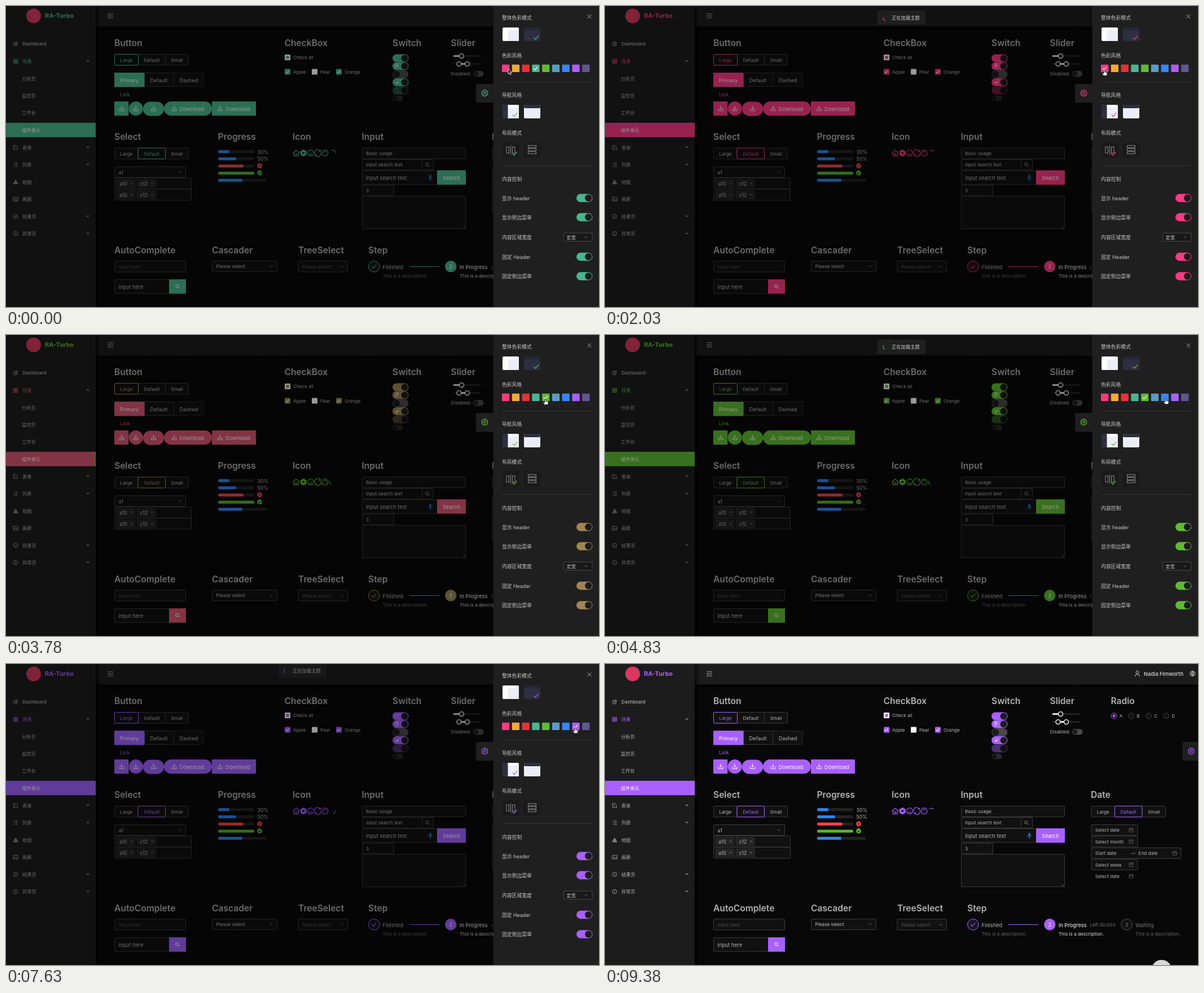
Recreate the animation shown at these times as an HTML page. Size 1051x533 px, loop 9450 ms.

```html
<!DOCTYPE html>
<html lang="zh">
<head>
<meta charset="utf-8">
<title>RA-Turbo</title>
<style>
html, body { margin: 0; width: 100%; height: 100%; overflow: hidden; background: #080808; }
svg { display: block; width: 1051px; height: 533px; }
text { font-family: Inter, "Noto Sans CJK SC", "Noto Sans CJK", sans-serif; dominant-baseline: central; white-space: pre; }
.f-now { fill: var(--now); }
.f-btn { fill: var(--btn); }
.f-sw { fill: var(--sw); }
.f-line { fill: var(--line); }
.s-now { stroke: var(--now); fill: none; }
.s-btn { stroke: var(--btn); fill: none; }
.s-line { stroke: var(--line); fill: none; }
</style>
</head>
<body>
<svg id="stage" viewBox="0 0 1051 533"></svg>
<script>
const LOOP = 9450;
const SWATCHES = ['#fb3983', '#f4a936', '#e33333', '#49b58e', '#5fba33', '#5a9bc5', '#3586fa', '#a960ff', '#605791'];
// [time, swatch index, spinner phase of the notice]
const THEMES = [[-2000, 3, 0], [1550, 0, 226], [3670, 4, 8], [5500, 6, 57], [7400, 7, 146]];
const POINTER = [[0, 890, 111], [500, 885, 112], [2500, 885, 113], [3300, 956, 113], [4200, 956, 113],
  [4830, 994, 112], [5900, 992, 112], [6440, 1012, 119], [6900, 1010, 112], [7600, 1010, 112],
  [8500, 636, 160], [9450, 636, 160]];
const CLOSE_AT = 8598;

// ---- drawing helpers ----
const attrs = o => Object.entries(o).map(([k, v]) => ` ${k}="${v}"`).join('');
const rect = (x, y, w, h, o) => `<rect x="${x}" y="${y}" width="${w}" height="${h}"${attrs(o)}/>`;
const circle = (x, y, r, o) => `<circle cx="${x}" cy="${y}" r="${r}"${attrs(o)}/>`;
const path = (d, o = {}) => `<path d="${d}"${attrs({ fill: 'none', stroke: '#aaa', 'stroke-width': 1, ...o })}/>`;
const text = (x, y, s, size = 8.2, fill = '#b4b4b4', o = {}) =>
  `<text x="${x}" y="${y}" font-size="${size}" ${fill.startsWith('f-') ? `class="${fill}"` : `fill="${fill}"`}${attrs(o)}>${s}</text>`;
const mid = { 'text-anchor': 'middle' };
const at = (x, y, body) => `<g transform="translate(${x} ${y})">${body}</g>`;
const box = (x, y, w, h, o = {}) => rect(x + .5, y + .5, w - 1, h - 1, { fill: '#111', stroke: '#3a3a3a', rx: 1, ...o });
const chevron = (x, y, s = 1, c = '#bbb') => path(`M${x - 2.3} ${y - s}l2.3 ${2 * s}l2.3 ${-2 * s}`, { stroke: c });
const down = (x, y) => chevron(x, y, 1.4, '#666');
const tick = (x, y, k = 1, o = {}) => path(`M${x - 3 * k} ${y}l${2.2 * k} ${2.3 * k}l${4 * k} ${-4.8 * k}`, { stroke: '#fff', 'stroke-width': 1.1, ...o });
const heading = (x, y, s) => text(x, y, s, 15.6, '#b2b2b2', { 'font-weight': 600 });
const accentTick = (x, y) => tick(x, y, 1.35, { stroke: 'var(--now)', 'stroke-width': 1.2 });
const download = (x, y) => path(`M${x - 4} ${y + 1}v3h8v-3M${x} ${y - 4.5}v6M${x - 2.2} ${y - .7}l2.2 2.2l2.2 -2.2`, { stroke: '#fff' });
const lens = (x, y, c) => path(`M${x + 1.5} ${y + 1.5}l2.3 2.3M${x + 2} ${y - .5}a2.7 2.7 0 1 1 -5.4 0a2.7 2.7 0 1 1 5.4 0`, { stroke: c });
const arc = o => path('M0 -5A5 5 0 0 1 5 0', { 'stroke-linecap': 'round', transform: 'rotate(-45)', ...o });

// six-toothed outline
function gear(r, o) {
  const points = [];
  for (let a = 0; a < 360; a += 60)
    for (const [turn, k] of [[-16, 1], [16, 1], [22, .8], [38, .8]]) {
      const rad = (a + turn) * Math.PI / 180;
      points.push(`${(Math.sin(rad) * r * k).toFixed(2)} ${(-Math.cos(rad) * r * k).toFixed(2)}`);
    }
  return `<path d="M${points.join('L')}Z" stroke-linejoin="round"${attrs(o)}/>`;
}

function toggle(x, y, w, h, on = true, mark = '', opacity = 1) {
  const bg = rect(x, y, w, h, { rx: h / 2, ...(on ? { class: 'f-sw' } : { fill: '#494949' }) });
  const knob = circle(on ? x + w - h / 2 : x + h / 2, y + h / 2, h / 2 - 1, { fill: '#1c1c1c' });
  return `<g opacity="${opacity}">${bg}${knob}${mark}</g>`;
}

function segments(xs, y, active) {
  const names = ['Large', 'Default', 'Small'];
  const cell = i => [xs[i], y, xs[i + 1] - xs[i] + 1, 20.4];
  return names.map((_, i) => box(...cell(i))).join('') +
    box(...cell(active), { stroke: 'var(--line)' }) +
    names.map((s, i) => text((xs[i] + xs[i + 1]) / 2 + .5, y + 10.5, s, 8.2, i === active ? 'f-line' : '#b4b4b4', mid)).join('');
}

function check(x, y, label, on, partial) {
  const fill = on ? { class: 'f-line' } : { fill: '#fff' };
  return rect(x, y, 10, 10, { rx: 1, ...fill }) + (on ? tick(x + 4.6, y + 5.2, .9) : '') +
    (partial ? rect(x + 2.3, y + 2.3, 5.4, 5.4, { class: 'f-line' }) : '') + text(x + 15, y + 5.3, label);
}

// ---- side menu ----
function sideMenu() {
  const g = { stroke: '#a2a2a2', 'stroke-width': .9 };
  const icons = {
    pie: path('M-1 -3A3.5 3.5 0 1 0 3 1H-1ZM1 -3.8A3.5 3.5 0 0 1 3.8 -1H1Z', g),
    form: path('M1 -3.5H-3.5V3.5H3.5V0M-1 1L3.5 -3.5', g),
    list: path('M-1.5 -3H4M-1.5 0H4M-1.5 3H4M-4 -3h1M-4 0h1M-4 3h1', g),
    warn: path('M0 -3.5L4 3.5H-4Z', { ...g, fill: '#777' }),
    image: path('M-4 -3.2H4V3.2H-4ZM-3 2L-1 -.5L1 1.5L2 .5L3.5 2', g),
    ok: circle(0, 0, 3.8, { fill: 'none', ...g }) + tick(-.2, .3, .55, g),
    info: circle(0, 0, 3.8, { fill: 'none', ...g }) + path('M0 -2v1M0 -.3V2.2', g)
  };
  const top = [['pie', 67, 'Dashboard'], ['form', 250.5, '表单', 1], ['list', 281, '列表', 1], ['warn', 311.5, '地图'],
    ['image', 342, '画廊'], ['ok', 372.5, '结果页', 1], ['info', 403, '异常页', 1]];
  let s = rect(0, 0, 159, 533, { fill: '#1c1c1c' }) + circle(49, 17.5, 13, { fill: '#d9375f' }) +
    text(69, 17, 'RA-Turbo', 11, 'f-now', { 'font-weight': 700 });
  for (const [icon, y, label, more] of top)
    s += at(17, y, icons[icon]) + text(29, y + .3, label, 8.2, '#b0b0b0', { 'font-weight': 500 }) + (more ? chevron(145, y - .5, 1.1, '#ddd') : '');
  for (const [x, y] of [[13.5, 94.5], [17.8, 94.5], [13.5, 98.8], [17.8, 98.8]])
    s += rect(x, y, 2.8, 2.8, { class: 's-btn', 'stroke-width': .9 });
  s += text(29, 98, '场景', 8.2, 'f-btn') + chevron(145, 97.5, -1.1, '#ddd');
  s += rect(0, 206.8, 159, 25.5, { class: 'f-btn' }) + rect(157, 206.8, 2, 25.5, { class: 'f-now' });
  ['分析页', '监控页', '工作台', '组件单元'].forEach((n, i) => s += text(28, 128.5 + 30.4 * i, n, 8.2, i === 3 ? '#fff' : '#b0b0b0'));
  return s;
}

// ---- header and page ----
function header() {
  const g = { stroke: '#999' };
  return rect(159, 0, 892, 36.5, { fill: '#1c1c1c' }) +
    rect(159, 36.5, 892, 8, { fill: 'url(#shadeY)' }) + rect(159, 0, 8, 533, { fill: 'url(#shadeX)' }) +
    path('M180 13.5h10M184 16.2h6M184 18.8h6M180 21.5h10M182.5 15.8v3.6l-2.5 -1.8z', { ...g, 'stroke-width': .9 }) +
    circle(943.5, 14.5, 2.5, { fill: 'none', stroke: '#ccc' }) + path('M939.3 22A4.3 4.6 0 0 1 947.8 22', { stroke: '#ccc' }) +
    text(955, 17.3, 'Nadia Fenworth', 9.2, '#c4c4c4', { 'font-weight': 600 }) +
    circle(1041.5, 17, 4.6, { fill: 'none', stroke: '#ccc', 'stroke-width': .8 }) +
    path('M1037 17h9M1041.5 12.4v9.2M1041.5 12.4q-4 4.6 0 9.2q4 -4.6 0 -9.2M1038 14.5h7M1038 19.5h7', { stroke: '#ccc', 'stroke-width': .7 });
}

function controls() {
  const btn = (x, y, w, h, rx = 1) => rect(x, y, w, h, { rx, class: 'f-btn' });
  let s = heading(192, 65, 'Button') + segments([192, 234, 282, 323], 85, 0);
  s += box(245, 118, 53, 25) + box(297, 118, 54, 25, { 'stroke-dasharray': '2 1.5' }) + btn(192, 118, 53.5, 25.5) +
    text(218.5, 131, 'Primary', 9.1, '#fff', mid) + text(271, 131, 'Default', 9.1, '#b4b4b4', mid) + text(324, 131, 'Dashed', 9.1, '#b4b4b4', mid) +
    text(202, 156.5, 'Link', 9.1, 'f-btn');
  s += btn(192, 169, 25.3, 25.3) + btn(217.5, 169, 25.3, 25.3, 12.7) + btn(242.8, 169.5, 37.4, 25.3, 12.7) + btn(280, 169, 85, 25.3, 12.7) + btn(365, 169, 78, 25.3);
  s += [205, 230, 261.5, 298, 379.5].map(x => download(x, 181.3)).join('') + [307.5, 389].map(x => text(x, 182, 'Download', 9.2, '#fff')).join('');

  s += heading(493.5, 65, 'CheckBox') + check(494, 86, 'Check all', false, true) +
    check(494, 111.5, 'Apple', true) + check(542, 111.5, 'Pear', false) + check(585, 111.5, 'Orange', true);

  s += heading(685, 65, 'Switch') + toggle(685, 85.5, 28.5, 14) + toggle(685, 99.5, 28.5, 14, true, text(689, 106.5, '开', 7.5, '#fff')) +
    toggle(685, 114, 28.5, 14, false) + toggle(685, 128, 28.5, 14, true, tick(693.5, 135, .9)) +
    toggle(685, 142.5, 28.5, 14, true, '', .42) + toggle(685, 158.7, 18.5, 9.8, false, '', .5);

  const knob = (x, y) => circle(x, y, 4, { fill: '#111', stroke: '#fff', 'stroke-width': 1.4 });
  s += heading(788.5, 65, 'Slider') + rect(793, 87.3, 49, 2.6, { fill: '#252525' }) + rect(793, 87.3, 14, 2.6, { fill: '#fff' }) + knob(807.5, 88.6) +
    rect(793, 101.3, 49, 2.6, { fill: '#252525' }) + rect(803, 101.3, 14, 2.6, { fill: '#fff' }) + knob(803, 102.6) + knob(817.5, 102.6) +
    text(788.5, 119.8, 'Disabled:') + toggle(828, 115, 18.5, 10.2, false);

  s += heading(896.5, 65, 'Radio');
  [902, 932.5, 963.5, 994.5].forEach((x, i) => s += circle(x, 91.7, 4.9, i ? { fill: '#111', stroke: '#444' } : { class: 's-line' }) + text(x + 9.7, 91.7, 'ABCD'[i]));
  return s + circle(902, 91.7, 2.5, { class: 'f-line' });
}

function inputs() {
  let s = heading(192, 231, 'Select') + segments([192, 233.5, 282, 323], 251, 1) + box(192, 284, 127, 20) + text(199.5, 294.5, 'a1', 8.8) + down(308, 294);
  for (const y of [304, 324]) {
    s += box(192, y, 137, 20.5);
    for (const [x, label] of [[195.5, 'a10'], [232, 'c12']])
      s += rect(x, y + 3, 33.5, 14.5, { fill: '#232323', stroke: '#303030', 'stroke-width': .7 }) + text(x + 5.5, y + 10.5, label, 8.8) +
        path(`M${x + 25} ${y + 8.2}l4 4m0 -4l-4 4`, { stroke: '#777', 'stroke-width': .8 });
  }

  s += heading(375.5, 231, 'Progress');
  [[64, 20, '#2d85ec'], [64, 32, '#2d85ec'], [64, 45, '#f0444a'], [64, 64, '#55b92c'], [86, 43, '#2d85ec']].forEach(([w, n, c], i) => {
    const y = 255.3 + i * 12.7;
    s += rect(376, y, w, 5.2, { rx: 2.6, fill: '#232323' }) + rect(376, y, n, 5.2, { rx: 2.6, fill: c });
  });
  s += text(445.5, 258.3, '30%', 8.8) + text(445.5, 270.8, '50%', 8.8) + circle(449.5, 283, 4.4, { fill: '#f0444a' }) +
    path('M448 281.5l3 3m0 -3l-3 3', { stroke: '#111' }) + circle(449.5, 295.7, 4.4, { fill: '#55b92c' }) + tick(449.3, 295.9, .65, { stroke: '#111' });

  const line = { class: 's-now', 'stroke-width': 1.1 };
  const face = circle(0, 0, 5.4, line) + path('M-2.4 1A2.5 2.5 0 0 0 2.4 1M-2.2 -1.5h.8M1.4 -1.5h.8', line);
  s += heading(508, 231, 'Icon') + at(514.3, 260.3, path('M-6 .5L0 -5.2L6 .5M-4.2 -1V5.2H4.2V-1M-1.3 5V1.5H1.3V5', line)) +
    at(527.2, 260.3, gear(5.6, { class: 'f-now', stroke: 'var(--now)' }) + circle(0, 0, 2, { fill: '#080808' })) +
    at(540, 260.3, face) + at(552.6, 260.3, path('M-5.2 1A5 5 0 0 1 4 -3.4M4.6 -5.5V-2.8H2M5.2 -1A5 5 0 0 1 -4 3.4M-4.6 5.5V2.8H-2', line)) +
    at(565.5, 260.3, `<g transform="rotate(180)">${face}</g>`) + at(578.5, 260.3, `<g id="spin">${arc(line)}</g>`);

  s += heading(630.5, 231, 'Input') + box(631, 251, 184, 20) + text(638, 261, 'Basic usage') +
    box(631, 271, 107, 20) + box(737, 271, 21, 20) + text(638, 281, 'input search text') + lens(747, 281, '#888') +
    box(631, 291, 134, 25.5) + text(638, 304.2, 'input search text', 9.2) +
    rect(750.6, 299, 3, 6, { rx: 1.5, fill: '#1d80dc' }) + path('M748.6 303A3.5 3.8 0 0 0 755.6 303M752.1 306.8V309.5', { stroke: '#1d80dc' }) +
    rect(764, 291, 51, 25.5, { class: 'f-btn' }) + text(789.5, 304.2, 'Search', 9.2, '#fff', mid) +
    box(631, 316.5, 57, 20) + text(638, 326.8, '3') + box(631, 336.5, 184, 58.5) + path('M810 393.5l3.5 -3.5M812 393.5l1.5 -1.5', { stroke: '#777', 'stroke-width': .7 });

  const calendar = (x, y) => path(`M${x - 3.5} ${y - 2.5}h7v6h-7zM${x - 3.5} ${y - .3}h7M${x - 1.6} ${y - 3.7}v2M${x + 1.6} ${y - 3.7}v2`, { stroke: '#666', 'stroke-width': .8 });
  s += heading(861, 231, 'Date') + segments([861.5, 903, 951.5, 993], 251, 1);
  [['Select date', 284], ['Select month', 304.3], ['Start date', 325, 160], ['Select week', 345.3], ['Select date', 365.7, 0]].forEach(([label, y, w = 83]) =>
    s += (w ? box(861.5, y, w, 20) : '') + text(868.7, y + 10.3, label) + calendar(w === 160 ? 1009.5 : 932.5, y + 9.8));
  return s + path('M932 335.5h7.5l-2.2 -1.7', { stroke: '#777', 'stroke-width': .8 }) + text(945.5, 335.3, 'End date');
}

function lastRow() {
  let s = heading(192, 432, 'AutoComplete') + box(192, 451, 127, 20.5) + text(199.5, 461.5, 'input here', 8.2, '#4c4c4c') +
    box(192, 484, 98, 25.5) + text(199.5, 497, 'input here', 9.2) + rect(289, 484, 30, 25.5, { class: 'f-btn' }) + lens(304, 496.5, '#fff') +
    heading(365, 432, 'Cascader') + box(365, 451, 116, 20) + text(372.5, 461, 'Please select', 8.2, '#c2c2c2') + down(470, 461) +
    heading(518, 432, 'TreeSelect') + box(517.5, 451, 88.5, 20.5) + text(525, 461.5, 'Please select', 8.2, '#555') + down(595, 461.5);
  s += heading(642, 432, 'Step') + circle(652.3, 461.3, 9.8, { fill: 'var(--line)', 'fill-opacity': .12, stroke: 'var(--line)' }) +
    tick(652, 461.5, 1.2, { stroke: 'var(--line)' }) + path('M715 461.5H768', { stroke: 'var(--now)', 'stroke-width': 1.2 }) +
    circle(788.3, 461.3, 10.2, { class: 'f-line' }) + text(788.3, 461.8, '2', 9.2, '#fff', mid) +
    circle(924.7, 461.3, 9.8, { fill: '#111', stroke: '#555' }) + text(924.7, 461.8, '3', 9.2, '#777', mid) +
    text(667.5, 462, 'Finished', 9.2) + text(803.8, 462, 'In Progress', 9.2, '#dcdcdc', { 'font-weight': 500 }) + text(940, 462, 'Waiting', 9.2, '#777') +
    `<g clip-path="url(#left)">${text(859, 462, 'Left 00:00:00', 8.2, '#777')}</g>`;
  [[667.5, '#666'], [803.8, '#ddd'], [940, '#666']].forEach(([x, c]) => s += text(x, 478.3, 'This is a description.', 8.2, c));
  return s + circle(986.5, 542, 18, { fill: '#d8d8d8' });
}

// ---- settings drawer ----
function drawer() {
  const label = (y, s) => text(879, y, s, 8.8, '#c6c6c6');
  const thumb = (x, y, fill) => rect(x, y, 29, 24, { rx: 2, fill });
  let s = rect(833, 138, 33, 33.3, { rx: 3, fill: '#1f1f1f' }) + rect(863.5, -5, 200, 545, { fill: '#1f1f1f' }) +
    at(848.5, 154.3, gear(5.6, { class: 's-now', 'stroke-width': 1.1 }) + circle(0, 0, 1.9, { class: 's-now', 'stroke-width': 1.1 })) +
    path('M1030.5 15l7 7m0 -7l-7 7', { stroke: '#aaa' });
  s += label(20.5, '整体色彩模式') + thumb(880, 38, '#fff') + rect(889.5, 43, 19.5, 19, { fill: '#ecedf6' }) +
    thumb(918, 38, '#2d2f40') + rect(918, 38, 29, 5, { fill: '#242636', rx: 2 }) + accentTick(939.5, 56) + label(87, '色彩风格');
  SWATCHES.forEach((c, i) => s += rect(879 + 17.77 * i, 103.7, 13.3, 13.3, { rx: 1, fill: c }));
  s += `<g id="pick">${tick(885.3, 110.5, 1.15)}</g>`;
  s += rect(879, 134, 160, 1, { fill: '#343434' }) + label(157.5, '导航风格') + thumb(880, 175, '#fff') + rect(889, 180, 20, 19, { fill: '#ecedf6' }) +
    rect(880, 175, 9.5, 24, { fill: '#2d2f40', rx: 1 }) + accentTick(902, 192.5) + thumb(918, 175, '#ecedf6') + rect(918, 175, 29, 6, { fill: '#2d2f40', rx: 2 });
  s += label(224, '布局模式') + [879.5, 917.5].map(x => rect(x, 241, 30, 28, { rx: 2, fill: '#1a1a1a' })).join('') +
    path('M887 249.5h4.5v11h-4.5zM897.5 249.5h4.5v11h-4.5zM894.5 246.5v17', { stroke: '#8c8c8c' }) + accentTick(901.5, 261.5) +
    [247, 252.5, 258].map(y => rect(925.5, y, 14, 3.8, { rx: .5, fill: 'none', stroke: '#8c8c8c', 'stroke-width': 1.1 })).join('');
  s += rect(879, 282, 160, 1, { fill: '#343434' }) + label(306, '内容控制');
  [[340, '显示 header'], [374, '显示侧边菜单'], [444, '固定 Header'], [478.5, '固定侧边菜单']].forEach(([y, n]) =>
    s += label(y, n) + toggle(1011, y - 7.2, 28.5, 14.4));
  return s + label(409.5, '内容区域宽度') + box(988, 401.5, 51.5, 15.5, { stroke: '#484848', fill: '#181818' }) + text(993.5, 409.5, '定宽', 8.2, '#ccc') + down(1028, 409.3);
}

const notice = `<g id="notice">${rect(483, 8, 85, 25.5, { rx: 1.5, fill: '#1f1f1f' })}${at(498, 21, `<g id="spin2">${arc({ class: 's-now', 'stroke-width': 1.1 })}</g>`)}${text(508, 21, '正在加载主题', 8.3, '#ccc')}</g>`;
const cursor = `<g id="cursor"><path id="arrow" d="M0 0V9.2L2.1 7.3L3.6 10.8L5.2 10.1L3.7 6.7H6.6Z" fill="#111" stroke="#fff" stroke-width=".9"/>
<path id="hand" d="M-1 .8Q0 -.5 1 .8V4.2Q5.2 4.2 5.2 6.2Q5.2 9 3.8 10.5H-1.4Q-2.8 8.5 -4 6.5Q-3.6 4.8 -1 7Z" fill="#fff" stroke="#111" stroke-width=".8"/></g>`;
const shade = (id, x, y) => `<linearGradient id="${id}" x2="${x}" y2="${y}"><stop stop-color="#000" stop-opacity=".7"/><stop offset="1" stop-opacity="0"/></linearGradient>`;

const stage = document.getElementById('stage');
stage.innerHTML = `<defs>${shade('shadeX', 1, 0)}${shade('shadeY', 0, 1)}<clipPath id="left"><rect x="855" y="450" width="50" height="24"/></clipPath></defs>` +
  rect(0, 0, 1051, 533, { fill: '#080808' }) + header() + sideMenu() + controls() + inputs() + lastRow() +
  rect(0, 0, 1051, 533, { id: 'mask', fill: '#000' }) + `<g id="drawer">${drawer()}</g>` + notice + cursor;

// ---- motion ----
const $ = id => document.getElementById(id);
const clamp = v => Math.max(0, Math.min(1, v));
const bezier = (x1, y1, x2, y2) => x => {
  const curve = (a, b, u) => 3 * a * u * (1 - u) ** 2 + 3 * b * u * u * (1 - u) + u ** 3;
  if (x <= 0 || x >= 1) return clamp(x);
  let lo = 0, hi = 1;
  for (let i = 0; i < 20; i++) {
    const m = (lo + hi) / 2;
    if (curve(x1, x2, m) < x) lo = m; else hi = m;
  }
  return curve(y1, y2, lo);
};
const ease = bezier(.25, .1, .25, 1), inOut = bezier(.645, .045, .355, 1), slide = bezier(.7, .3, .1, 1);
const glide = u => u * u * (3 - 2 * u);
const rgb = c => [1, 3, 5].map(i => parseInt(c.slice(i, i + 2), 16));
const mix = (a, b, u) => `rgb(${rgb(a).map((v, i) => Math.round(v + (rgb(b)[i] - v) * u))})`;

function render(t) {
  const n = THEMES.findLastIndex(k => k[0] <= t);
  const [start, index, phase] = THEMES[n];
  const age = t - start, to = SWATCHES[index], from = SWATCHES[THEMES[Math.max(0, n - 1)][1]];
  const set = (name, u) => stage.style.setProperty(name, mix(from, to, u));
  set('--now', 1);
  set('--btn', inOut(age / 300));
  set('--sw', glide(clamp(age / 200)));
  set('--line', ease(age / 300));
  $('pick').setAttribute('transform', `translate(${17.77 * index} 0)`);

  const turn = 35 + t * .342;
  $('spin').setAttribute('transform', `rotate(${turn})`);
  $('spin2').setAttribute('transform', `rotate(${turn + phase})`);

  const show = n ? Math.min(ease((age - 150) / 250), 1 - ease((age - 1350) / 250)) : 0;
  $('notice').setAttribute('opacity', show);
  $('notice').setAttribute('transform', `translate(0 ${-20 * (1 - show)})`);

  const shut = slide((t - CLOSE_AT) / 300);
  $('drawer').setAttribute('transform', `translate(${190.5 * shut} 0)`);
  $('mask').setAttribute('opacity', .4 * (1 - shut));

  const i = Math.min(POINTER.findLastIndex(p => p[0] <= t), POINTER.length - 2);
  const [a, b] = [POINTER[i], POINTER[i + 1]];
  const u = glide((t - a[0]) / (b[0] - a[0]));
  const x = a[1] + (b[1] - a[1]) * u, y = a[2] + (b[2] - a[2]) * u;
  const over = t > 140 && y > 103 && y < 117.5 && x > 879 && x < 1035 && (x - 879) % 17.77 < 15.5;
  $('cursor').setAttribute('transform', `translate(${x} ${y})`);
  $('cursor').style.display = t < 9000 ? '' : 'none';
  $('arrow').style.display = over ? 'none' : '';
  $('hand').style.display = over ? '' : 'none';
}

const origin = performance.now();
function frame() {
  render((performance.now() - origin) % LOOP);
  requestAnimationFrame(frame);
}
frame();
</script>
</body>
</html>
```
